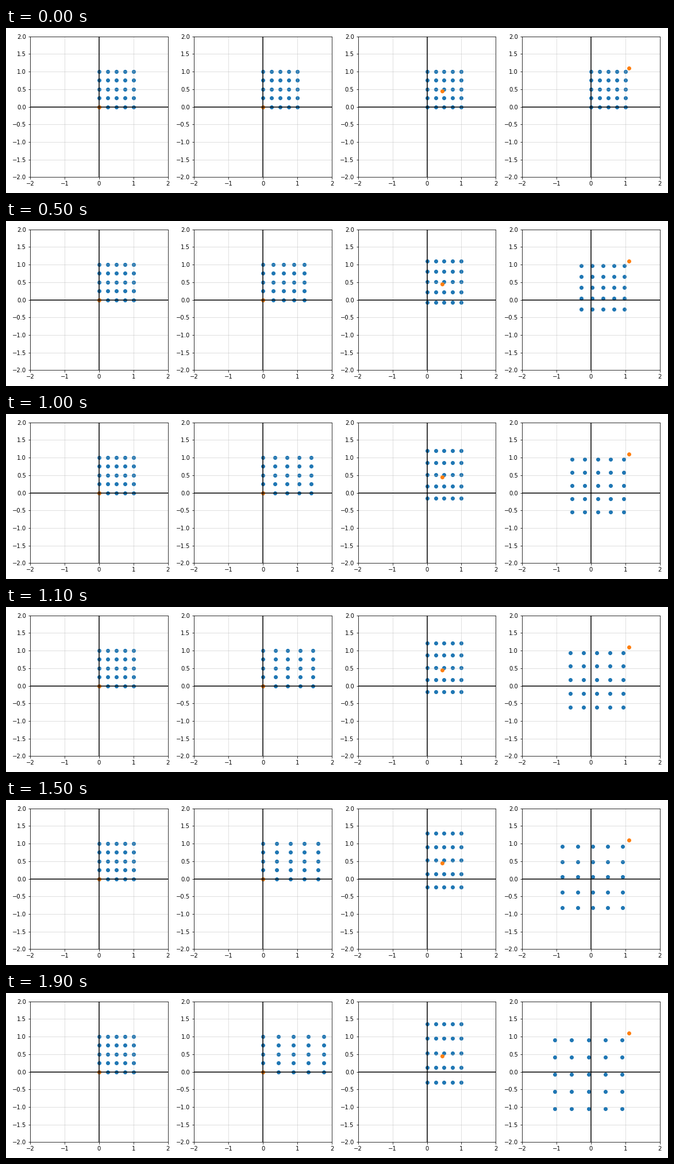
These frames come from a looping animation (1152 by 288 pixels, 2 s). A matplotlib script:

```python
import numpy as np
import matplotlib.pyplot as plt
from matplotlib.animation import FuncAnimation

WIDTH, HEIGHT, DPI = 1152, 288, 72
FRAMES = 20
INTERVAL = 100

# Horizontal layout in pixels: first axes' left edge, axes width, panel spacing.
LEFT, PANEL_W, PITCH = 42.05, 239.75, 285.3

steps = np.linspace(0, 1, 5)
lattice = np.array([(x, y) for x in steps for y in steps])


class Panel:
    """A point lattice that grows linearly away from a fixed pivot on the diagonal."""

    def __init__(self, ax, pivot, grow_x=0.0, grow_y=0.0):
        self.pivot = pivot
        self.growth = np.array([grow_x, grow_y])
        ax.set(xlim=(-2, 2), ylim=(-2, 2),
               xticks=np.arange(-2, 3), yticks=np.arange(-2, 2.5, 0.5))
        ax.grid(alpha=0.5)
        ax.axhline(0, color="black")
        ax.axvline(0, color="black")
        self.dots = ax.scatter(*lattice.T, color="tab:blue")
        ax.scatter(pivot, pivot, color="tab:orange")

    def show(self, frame):
        scale = 1 + self.growth * frame
        self.dots.set_offsets(self.pivot + (lattice - self.pivot) * scale)


plt.rcParams.update({"font.family": "DejaVu Sans", "font.size": 10})
fig, axes = plt.subplots(1, 4, figsize=(WIDTH / DPI, HEIGHT / DPI), dpi=DPI)
panels = [
    Panel(axes[0], 0),
    Panel(axes[1], 0, grow_x=0.04),
    Panel(axes[2], 0.45, grow_y=0.035),
    Panel(axes[3], 1.1, grow_x=0.05, grow_y=0.05),
]
fig.tight_layout()
fig.subplots_adjust(left=LEFT / WIDTH,
                    right=(LEFT + 3 * PITCH + PANEL_W) / WIDTH,
                    wspace=PITCH / PANEL_W - 1)


def update(frame):
    for panel in panels:
        panel.show(frame)
    return [panel.dots for panel in panels]


anim = FuncAnimation(fig, update, frames=FRAMES, interval=INTERVAL, repeat=True)
plt.show()
```
